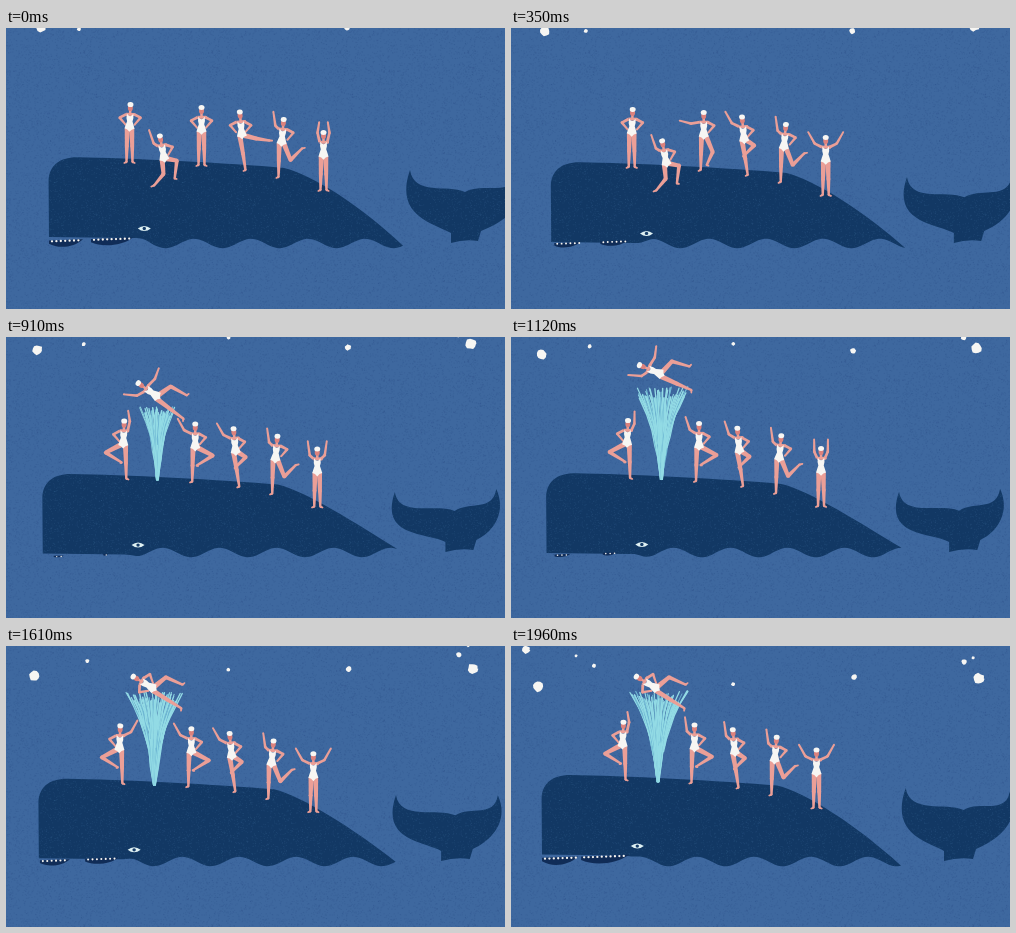
These frames come from a looping animation (499 by 281 pixels, 2030 ms). An HTML page with a canvas:

```html
<!DOCTYPE html>
<html lang="en">
<head>
<meta charset="utf-8">
<title>Whale swimmers</title>
<style>
html, body { margin: 0; width: 100%; height: 100%; overflow: hidden; background: #3e689f; }
canvas { display: block; width: 499px; height: 281px; }
</style>
</head>
<body>
<canvas id="stage" width="499" height="281"></canvas>
<script>
const c = document.getElementById('stage').getContext('2d');
const STEP = 70, STEPS = 29, END = STEPS - 1;
const SEA = '#3e689f', NAVY = '#123864', SKIN = '#eb9f97', FACE = '#dd827d',
  WHITE = '#f7f6f3', SPRAY = '#93dbe5';
const { PI, sin, cos, abs, min, max, hypot, atan2 } = Math;

const clamp = v => min(1, max(0, v));
const lerp = (a, b, u) => a + (b - a) * u;
const smooth = u => { u = clamp(u); return u * u * (3 - 2 * u); };

function seeded(seed) {
  return () => {
    seed = (seed * 1664525 + 1013904223) >>> 0;
    return seed / 4294967296;
  };
}

function grain(color, count, seed) {
  const tile = document.createElement('canvas');
  tile.width = tile.height = 128;
  const g = tile.getContext('2d'), rnd = seeded(seed);
  g.fillStyle = color;
  for (let i = 0; i < count; i++) g.fillRect(rnd() * 128, rnd() * 128, 1, 1);
  return c.createPattern(tile, 'repeat');
}
const seaGrain = grain('rgba(20,50,110,.1)', 2600, 4);
const whaleGrain = grain('rgba(70,115,160,.2)', 2200, 9);

function fill(color, texture) {
  c.fillStyle = color;
  c.fill();
  if (texture) {
    c.fillStyle = texture;
    c.fill();
  }
}

// ---- motion rules, k = step in the loop ----
const drift = k => -12 * (k / END) ** 0.85;
const bob = k => 7.6 * sin(PI * (k / 27.5) ** 0.88);
const launch = k => sin(clamp((k - 8) / 9) * PI / 2);
const settle = k => smooth((k - 19) / 4);
const wave = (x, k) => 215.5 - 4.7 * cos(2 * PI * ((x - 188) / 57 - k / STEPS));

// ---- falling stars: x, start y, speed, sideways drift, radius ----
const STARS = [
  [35, -1, 1, -8, 5], [73, 1, 0.45, 10, 2], [341, 0, 0.75, 2, 2.9],
  [223, -18, 1.35, -1, 1.9], [462, -6, 0.93, 6, 5.2], [452, -11.5, 0.66, 1, 2.6],
  [15, -36, 0.96, 0, 4], [65, -40, 1.2, 0, 1.5], [462, -36, 1.15, 0, 1.5]
];

function stars(k) {
  const fall = 0.7 * k + 0.028 * k * k;
  STARS.forEach(([x, y, speed, side, r], i) => {
    const rnd = seeded(i * 97 + k * 31 + 5);
    c.beginPath();
    for (let a = 0; a < 2 * PI; a += PI / 5.5) {
      const q = r * (0.85 + rnd() * 0.3);
      c.lineTo(x + side * k / END + cos(a) * q, y + speed * fall + sin(a) * q);
    }
    fill(WHITE);
  });
}

// ---- whale ----
function body(k, dx, dy) {
  const X = x => x + dx, Y = y => y + dy;
  const tip = X(397) + 5 * (k / END) ** 3, flat = X(125);
  c.beginPath();
  c.moveTo(X(43), Y(209));
  c.lineTo(X(42.6), Y(153));
  c.bezierCurveTo(X(43), Y(138), X(53), Y(129), X(72), Y(129.3));
  c.bezierCurveTo(X(120), Y(130), X(225), Y(135), X(278), Y(140));
  c.bezierCurveTo(X(307), Y(147), X(358), Y(180), tip, wave(tip, k));
  for (let x = tip; x > flat; x -= 3)
    c.lineTo(x, lerp(Y(210), wave(x, k), smooth((x - flat) / 22)));
  c.lineTo(flat, Y(210));
  c.closePath();
  fill(NAVY, whaleGrain);
}

function tail(k) {
  const swing = (1 - k / 17) ** 2, dip = sin(PI * k / END), u = k / END;
  const lx = 388 + 16 * swing, ly = 142 + 13 * dip;
  const nx = 448 + 11 * swing, ny = 164 + 10 * dip;
  const rx = 489 + 23 * swing, ry = 146 + 6 * dip;
  const sx = 445 - 12 * u, tx = 472 - 10 * u, y = 213;
  c.beginPath();
  c.moveTo(lx, ly);
  c.bezierCurveTo(lx + 4, ly + 26, nx - 18, ny - 8, nx, ny);
  c.bezierCurveTo(nx + 16, ny - 10, rx - 4, ry + 23, rx, ry);
  c.bezierCurveTo(rx + 11, ry + 24, rx - 4, ry + 44, tx + 3, y - 10);
  c.lineTo(tx, y);
  c.quadraticCurveTo((sx + tx) / 2, y - 2, sx, y + 2);
  c.lineTo(sx, y - 8);
  c.bezierCurveTo(sx - 18, y - 18, lx - 16, ly + 46, lx, ly);
  fill(NAVY, whaleGrain);
}

function jaw(k, dx) {
  const open = abs(1 - k / 13), depth = 1 + 6.5 * open;
  const line = x => 220 - 6.5 * open - (x - 40) * 0.035;
  for (const [mid, w] of [[59 + dx, 10 + 26 * open], [106 + dx, 5 + 37 * open]]) {
    const from = max(43 + dx, mid - w / 2), to = mid + w / 2;
    c.beginPath();
    c.moveTo(from, line(from) - 1);
    c.lineTo(to, line(to) - 1);
    c.bezierCurveTo(to - w / 4, line(to) + depth, from + w / 4, line(from) + depth,
      from, line(from) + depth * 0.3);
    fill('#102c57');
    for (let x = from + 3; x < to - 1; x += 4.4) {
      c.beginPath();
      c.arc(x, line(x), 0.7 + 0.45 * min(1, open), 0, 7);
      fill(WHITE);
    }
  }
}

function eye(x, y) {
  c.beginPath();
  c.moveTo(x - 6.5, y);
  c.quadraticCurveTo(x, y - 5, x + 6.5, y);
  c.quadraticCurveTo(x, y + 5, x - 6.5, y);
  fill('#dff1f3');
  c.beginPath();
  c.arc(x, y, 1.7, 0, 7);
  fill('#163c68');
}

// ---- water jet ----
function jet(k, dx, dy) {
  const up = launch(k);
  if (!up) return;
  const x = 156 + dx * 0.75, y = 136 + dy * 0.9, top = 141 - 93 * up - 3 * settle(k);
  const half = 1 + 28 * up * up, h = y - top;
  const rnd = seeded(k * 613 + 11), n = 16 + half * 1.4;
  c.lineCap = 'round';
  for (let i = 0; i < n; i++) {
    const side = (i + rnd()) / n * 2 - 1;
    const from = i % 3 ? rnd() * 0.5 : 0, to = 1 - rnd() * 0.14;
    c.beginPath();
    for (let j = 0; j <= 5; j++) {
      const v = lerp(from, to, j / 5);
      const wobble = j % 5 ? (rnd() - 0.5) * 2 * up : 0;
      c.lineTo(x + side * (1 + half * (0.4 * v + 0.6 * v ** 3)) + wobble, y - h * v);
    }
    c.strokeStyle = i % 5 === 2 ? '#6eb7d3' : SPRAY;
    c.lineWidth = 0.9 + rnd() * 0.7;
    c.stroke();
  }
}

// ---- swimmers ----
// Right-side joints: elbow and hand from the shoulders, knee and foot from the hip.
const ARMS = {
  hip: [10.5, 4, 4.5, 11], up: [7.5, -3, 9.5, -17], wide: [11, -3, 17.5, -14.5],
  out: [13, 2, 24, -1], top: [6, -9, 4.3, -19.5]
};
const LEGS = {
  stand: [2.7, 17, 3, 33], lean: [-1, 17, -3.5, 33.5], half: [9, 15, 3, 28],
  knee: [17.5, 7, 1.5, 17], kick: [14, 2, 27, 4], cross: [10, 4, -1, 15],
  back: [9, 16, 20.5, 4.5], dangle: [3.6, 13.5, 15, 23], sit: [12, 3, 6.5, 20],
  fold: [16, 4, 18, 22]
};
// Poses are reached on these steps; a shorter list holds its last pose.
const BEATS = [0, 5, 9, 13, 19, 23, 28];
const WAVING = 'up wide up wide up';

const TEAM = [
  { x: 123.5, y: 101, lean: 0.04, arms: ['hip', 'hip hip wide top up wide top'],
    legs: ['stand stand half knee', 'stand'] },
  { x: 195.5, y: 104, lean: 0, arms: ['hip out ' + WAVING, 'hip'],
    legs: ['stand', 'stand half knee'] },
  { x: 236, y: 108.5, lean: -0.09, arms: ['hip wide ' + WAVING, 'hip'],
    legs: ['lean', 'kick cross'] },
  { x: 275.5, y: 116, lean: 0.09, arms: ['up', 'hip'], legs: ['stand', 'back'] },
  { x: 317.5, y: 129, lean: 0, arms: ['top wide wide up top wide', 'top wide wide up top wide'],
    legs: ['stand', 'stand'] }
];
const ACROBAT = {
  arms: ['up up out wide up hip', 'hip hip out out out hip'],
  legs: ['dangle dangle dangle stand', 'sit sit sit fold']
};

function pose(table, names, k) {
  const list = names.split(' '), at = i => table[list[min(i, list.length - 1)]];
  const i = max(0, BEATS.findIndex(b => b >= k) - 1);
  const u = smooth((k - BEATS[i]) / (BEATS[i + 1] - BEATS[i]));
  return at(i).map((v, n) => lerp(v, at(i + 1)[n], u));
}

function taper(x1, y1, w1, x2, y2, w2) {
  const a = atan2(y2 - y1, x2 - x1) + PI / 2, s = sin(a) / 2, q = cos(a) / 2;
  c.beginPath();
  c.moveTo(x1 + q * w1, y1 + s * w1);
  c.lineTo(x2 + q * w2, y2 + s * w2);
  c.lineTo(x2 - q * w2, y2 - s * w2);
  c.lineTo(x1 - q * w1, y1 - s * w1);
  c.fill();
  c.beginPath();
  c.arc(x2, y2, w2 / 2, 0, 7);
  c.fill();
}

function limb(x, y, [jx, jy, ex, ey], w1, w2, w3) {
  taper(x, y, w1, jx, jy, w2);
  taper(jx, jy, w2, ex, ey, w3);
}

function suit(len) {
  c.beginPath();
  c.moveTo(0, 2.8);
  for (const s of [1, -1]) {
    const bend = (a, b, x, y) => c.quadraticCurveTo(a * s, b, x * s, y);
    if (s > 0) {
      bend(2, 0, 5, -0.5);
      bend(4, -4, 2.7, -len / 2);
      bend(4, 5 - len, 3.2, -len);
      bend(0, 5 - len, -3.2, -len);
    } else {
      bend(4, 5 - len, 2.7, -len / 2);
      bend(4, -4, 5, -0.5);
      bend(2, 0, 0, 2.8);
    }
  }
  fill(WHITE);
}

// Limbs hang upright from a leaning torso, or turn with the whole body.
function swimmer(x, y, lean, turn, who, k) {
  const len = 15.3, sx = sin(lean) * len, sy = -cos(lean) * len;
  c.save();
  c.translate(x, y);
  c.rotate(turn);
  c.fillStyle = SKIN;
  [-1, 1].forEach((side, i) => {
    const place = (p, px, py) => p.map((v, n) => n % 2 ? py + v : px + v * side);
    const leg = place(pose(LEGS, who.legs[i], k), 0, 0), [kx, ky, fx, fy] = leg;
    limb(side * 2.2, -1, leg, 5.2, 3.9, 2.3);
    const shin = hypot(fx - kx, fy - ky);
    taper(fx, fy, 2.3, fx + (fx - kx) / shin + side * 2.3, fy + (fy - ky) / shin, 1.6);
    limb(sx + side * 3.8, sy + 0.5, place(pose(ARMS, who.arms[i], k), sx, sy), 2.9, 2.6, 1.9);
  });
  c.rotate(lean);
  taper(-4, 0.6 - len, 3, 4, 0.6 - len, 3);
  taper(0, -len, 2.5, 0, -20, 2.5);
  suit(len);
  c.beginPath();
  c.ellipse(0, -21.2, 2.5, 3.3, 0, 0, 7);
  fill(FACE);
  c.beginPath();
  c.ellipse(0, -24.5, 3, 2.5, 0, 0, 7);
  fill(WHITE);
  c.restore();
}

function draw(k) {
  const dx = drift(k), dy = bob(k), up = launch(k), rest = settle(k);
  for (const color of [SEA, seaGrain]) {
    c.fillStyle = color;
    c.fillRect(0, 0, 499, 281);
  }
  stars(k);
  tail(k);
  body(k, dx, dy);
  jaw(k, dx);
  eye(138.3 + dx, 200.5 + dy);
  jet(k, dx, dy);
  for (const who of TEAM) swimmer(who.x + dx, who.y + dy, who.lean, 0, who, k);
  swimmer(158.5 + dx, lerp(132 + dy, 36, up) + 7 * rest, 0,
    -0.19 - up + 0.15 * rest, ACROBAT, k);
}

let last = -1;
function tick() {
  const k = Math.floor(performance.now() / STEP) % STEPS;
  if (k !== last) draw(last = k);
  requestAnimationFrame(tick);
}
tick();
</script>
</body>
</html>
```
